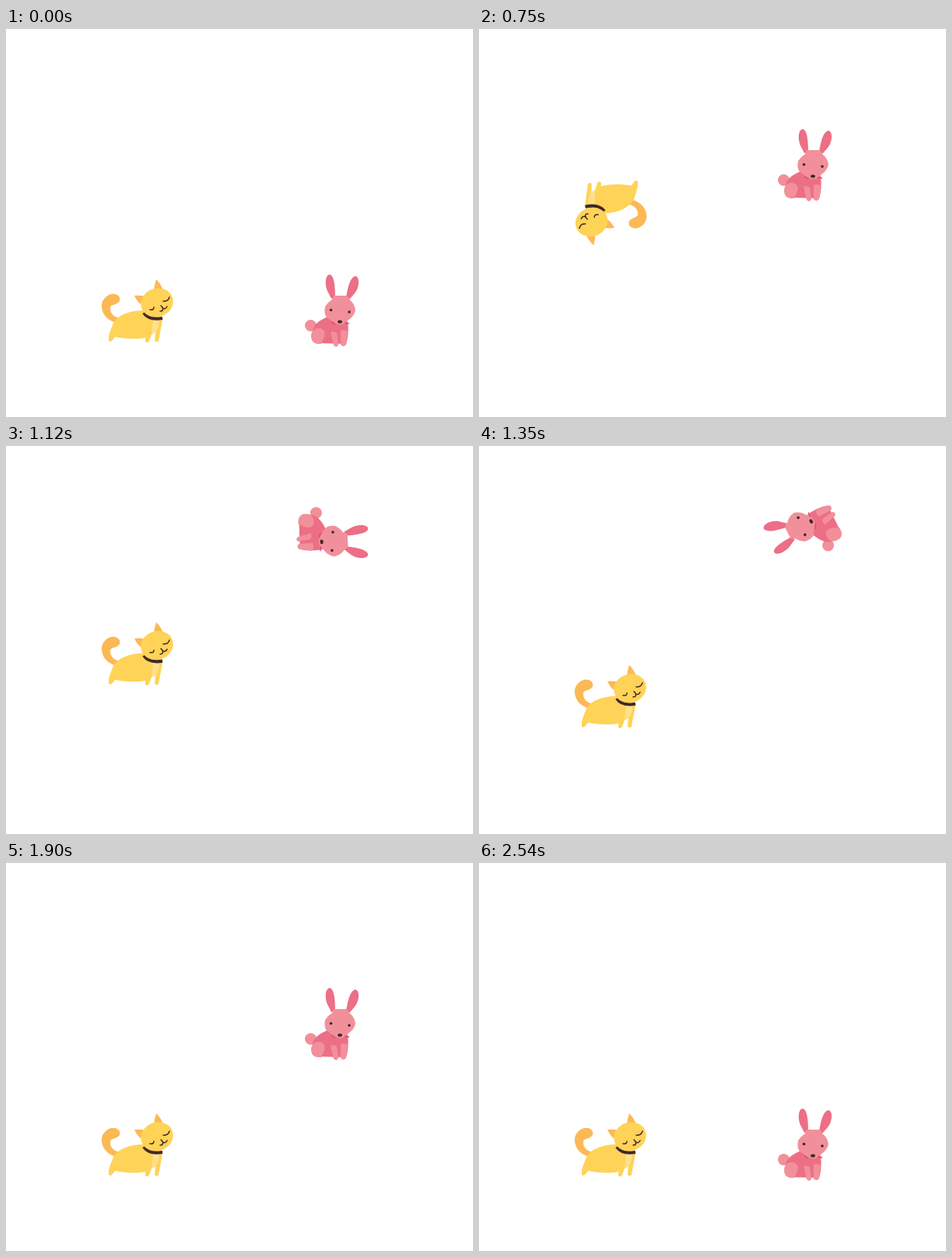
Animation of 600x500 px, one loop 3.75 s. Source, as an HTML page:

```html
<!DOCTYPE html>
<html lang="en">
<head>
<meta charset="utf-8">
<title>Cat and rabbit</title>
<style>
html, body { margin: 0; width: 100%; height: 100%; overflow: hidden; background: #fff; }
svg { display: block; width: 600px; height: 500px; }
.gold { fill: #ffd357; }
.amber { fill: #fbb955; }
.pink { fill: #f1909b; }
.rose { fill: #ec6f86; }
.dark { fill: #40292a; }
.ink { fill: none; stroke: #40292a; stroke-width: 1.5; stroke-linecap: round; }
</style>
</head>
<body>
<svg viewBox="0 0 600 500">
  <rect width="600" height="1" fill="#c6c6c6"/>

  <g id="cat">
    <path class="amber" d="M146 351C148 344 141 341 135 342C127 344 122 352 123 359C124 370 133 377 142 379L148 373C139 373 133 366 134 359C135 355 143 356 146 351Z"/>
    <path class="gold" d="M132 402C131 394 136 385 138 379C145 368 160 363 176 363L201 373C200 384 197 394 196 402Q194 405 191 402L192 391L187 394L184 402Q182 406 179 403L179 398C166 401 151 399 140 397Q138 400 136 402Q134 404 132 402Z"/>
    <path fill="#ffe18c" d="M189 375L197 375Q196 387 192 392L187 393Z"/>
    <path class="amber" d="M193 323Q200 330 202 338L190 340Q190 331 193 323Z"/>
    <path class="amber" d="M165 344Q172 343 179 345L173 355Q168 351 165 344Z"/>
    <path class="ink" style="stroke-width:4.2;stroke-linecap:butt" d="M177 366Q184 376 201 373"/>
    <ellipse class="gold" cx="194" cy="353" rx="21" ry="18.3" transform="rotate(-18 194 353)"/>
    <path class="ink" d="M185 362Q190 363 190 359M202 351Q208 352 210 346M199 357L201 359Q203 364 198 364M201 360Q205 362 207 358"/>
  </g>

  <g id="rabbit">
    <ellipse class="pink" cx="391.5" cy="382.5" rx="7.5" ry="7.5"/>
    <path class="rose" d="M414 371C404 375 396 380 394 388L393 396L399 405L437 406Q441 394 439 377Z"/>
    <path class="pink" d="M392 396C392 389 397 386 402 386C408 386 411 391 409 397L405 406Q392 407 392 396Z"/>
    <path class="pink" d="M417 391Q421 389 425 392L427 407Q425 412 421 408ZM430 389Q435 387 439 390L437 407Q433 411 430 407Z"/>
    <path class="rose" d="M416 317C410 317 409 331 414 340L418 348L423 346C423 334 422 318 416 317Z"/>
    <path class="rose" d="M449 319C455 320 454 334 448 341L441 349L437 346C439 334 442 320 449 319Z"/>
    <path class="pink" d="M421 344H437Q440 345 441 349Q448 354 449 363Q447 371 439 376Q434 383 426 381Q419 377 412 372Q408 367 410 358Q414 352 419 349Z"/>
    <g class="dark">
      <circle cx="417.5" cy="362.5" r="1.8"/>
      <circle cx="441" cy="365" r="1.8"/>
      <ellipse cx="429" cy="377.5" rx="2.9" ry="2.1"/>
    </g>
    <path fill="none" stroke="#d84f6c" stroke-width="1.3" d="M435 379L441 380M418 378L423 381"/>
  </g>
</svg>
<script>
const LOOP = 3750, STEP = 25;
const part = (t, from, to) => Math.min(1, Math.max(0, (t - from) / (to - from)));

// Rise, make one full turn at the top, then sink back.
const actors = [
  { id: "cat", x: 169, y: 363, height: 125, times: [16, 505, 1004, 1514] },
  { id: "rabbit", x: 419, y: 363.5, height: 250, times: [8, 1000, 1520, 2520] }
];

function pose({ id, x, y, height, times: [start, top, turned, end] }, t) {
  const lift = height * (part(t, start, top) - part(t, turned, end));
  const angle = 360 * part(t, top, turned);
  document.getElementById(id).setAttribute("transform",
    `translate(0 ${-lift}) rotate(${angle} ${x} ${y})`);
}

function draw() {
  const now = performance.now() % LOOP;
  const t = (Math.floor((now - 20) / STEP) + 1) * STEP;
  actors.forEach(actor => pose(actor, t));
  requestAnimationFrame(draw);
}
draw();
</script>
</body>
</html>
```
